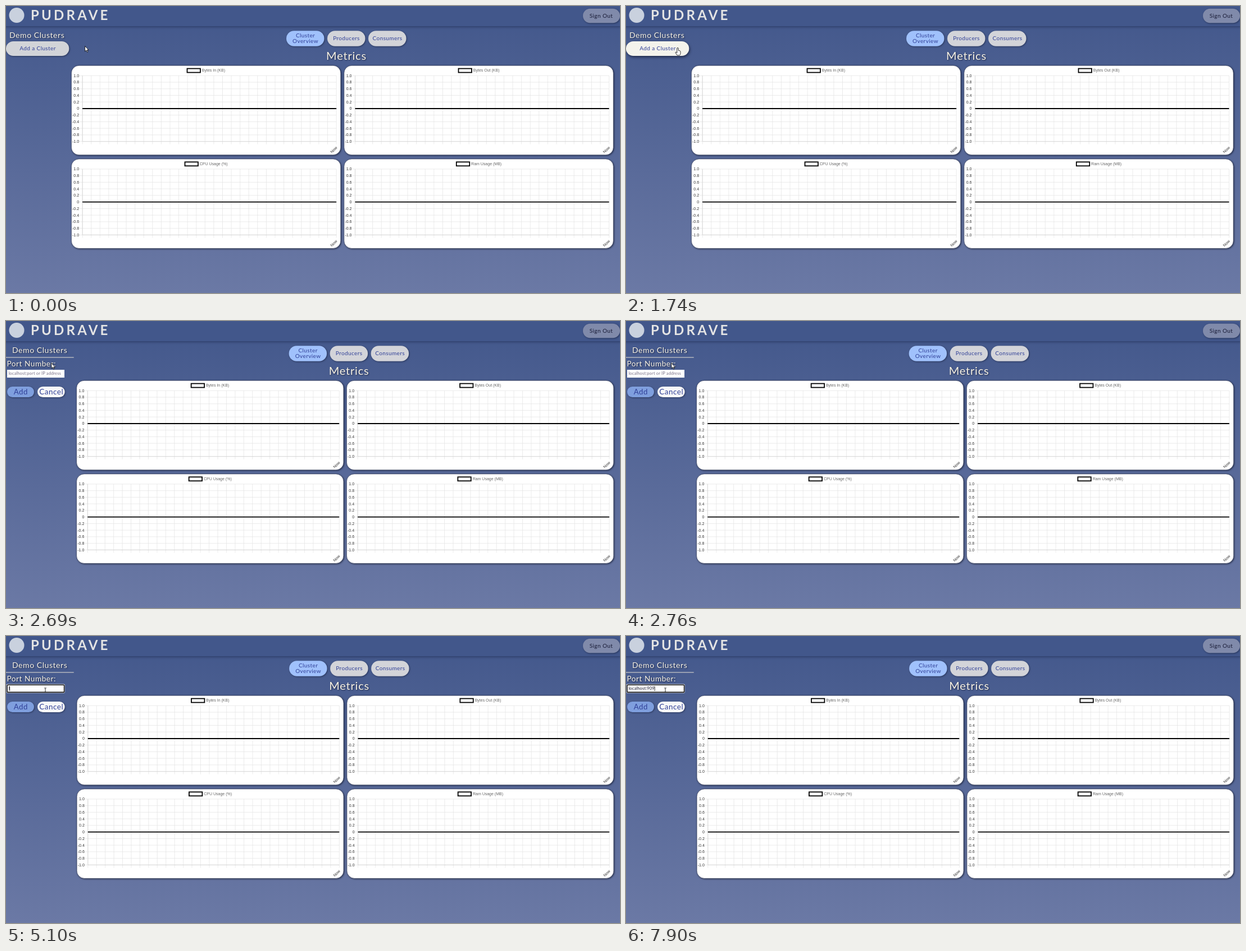
Animation of 1093 by 512 pixels, one loop 8 s. Source, as an HTML page:

```html
<!DOCTYPE html>
<html lang="en">
<head>
<meta charset="utf-8">
<title>Cluster dashboard</title>
<style>
  html, body { margin: 0; width: 100%; height: 100%; overflow: hidden; background: #566898; }
  svg { display: block; width: 100vw; height: 100vh; }
  text { font-family: Lato, "Open Sans", sans-serif; letter-spacing: .04em; white-space: pre; }
  .chart text { font: 7px "Liberation Sans", Arial, sans-serif; letter-spacing: 0; fill: #333; }
  .chart .legend { fill: #666; }
  .heading { fill: #f7f2e4; filter: drop-shadow(1px 1px 1px rgba(20, 25, 50, .75)); }
  .label { fill: #2f3f97; }
  .raised { filter: drop-shadow(1px 1px 1.5px rgba(15, 22, 50, .55)); }
  .panel { filter: drop-shadow(1px 1.5px 1.5px rgba(10, 15, 35, .7)); }
</style>
</head>
<body>
<svg id="stage" viewBox="0 0 1093 512" preserveAspectRatio="none"></svg>
<script>
const LOOP = 8000;
const stage = document.getElementById('stage');

// Markup helpers
const text = (x, y, size, content, attrs = '') =>
  `<text x="${x}" y="${y}" font-size="${size}" ${attrs}>${content}</text>`;
const rect = (x, y, w, h, fill, attrs = '') =>
  `<rect x="${x}" y="${y}" width="${w}" height="${h}" fill="${fill}" ${attrs}/>`;
const pill = (x, y, w, h, fill, attrs = 'class="raised"') =>
  rect(x, y, w, h, fill, `rx="${h / 2}" ${attrs}`);
const centred = (x, y, size, content, attrs = 'class="label"') =>
  text(x, y, size, content, `text-anchor="middle" ${attrs}`);
const line = (d, color, width) =>
  `<path d="${d}" fill="none" stroke="${color}" stroke-width="${width}"/>`;

function chart(x, y, width, title, legendOffset) {
  const left = x + 19.7, right = x + width - 7.7;
  const top = y + 18, pitch = 11.75, bottom = top + pitch * 10;
  const legendX = x + width / 2 - legendOffset;
  let grid = '', labels = '';
  for (let i = 0; i <= 10; i++) {
    const gy = top + i * pitch, value = 1 - i / 5;
    grid += `M${left - 5} ${gy}H${right}`;
    const label = i === 5 ? '0' : value.toFixed(1);
    labels += text(left - 6, gy + 2.4, 7, label, 'text-anchor="end"');
  }
  for (let i = 0; i < 30; i++)
    grid += `M${left + (right - left) * i / 29} ${top}V${bottom + 5}`;
  return `<g class="chart">
    ${rect(x, y, width, 159.5, '#fff', 'rx="13.5" class="panel" stroke="#27304d" stroke-width=".6"')}
    ${line(grid, '#e3e3e3', .7)}
    ${line(`M${left} ${top}V${bottom}H${right}`, '#cfcfcf', .7)}
    ${line(`M${left} ${top + 5 * pitch}H${right}`, '#000', 1.9)}
    ${labels}
    ${rect(legendX + .7, y + 5.4, 23.4, 7, '#fff', 'stroke="#000" stroke-width="1.8"')}
    ${text(legendX + 27, y + 11, 7, title, 'class="legend"')}
    <text transform="translate(${right + 2} ${y + 147}) rotate(-45)" text-anchor="end">Now</text>
  </g>`;
}

function mainArea(id, left, right, width, shift) {
  const tabs = [['', 499, '#a0c1fc'], ['Producers', 572, '#d3d4d9'], ['Consumers', 645, '#d3d4d9']]
    .map(([name, x, fill]) => pill(x + shift, 44.3, 67.5, 27.5, fill) +
      centred(x + shift + 34, 61.4, 10, name)).join('');
  return `<g id="${id}">
    ${tabs}
    ${centred(533 + shift, 56.2, 10, 'Cluster')}
    ${centred(533 + shift, 66.4, 10, 'Overview')}
    ${centred(606 + shift, 96, 20, 'Metrics', 'class="heading"')}
    ${chart(left, 106.2, width, 'Bytes In (KB)', 34.3)}
    ${chart(right, 106.2, width, 'Bytes Out (KB)', 36.7)}
    ${chart(left, 272.9, width, 'CPU Usage (%)', 38.3)}
    ${chart(right, 272.9, width, 'Ram Usage (MB)', 40.4)}
  </g>`;
}

const header = `
  ${rect(-10, -10, 1113, 46, '#42578b', 'style="filter:drop-shadow(0 1px 2.5px rgba(20,30,65,.6))"')}
  <circle cx="19" cy="16.5" r="13.5" fill="#c9d1de"/>
  ${text(44, 25, 24, 'PUDRAVE', 'fill="#e4e4e4" font-weight="700" style="letter-spacing:4.2px"')}
  ${pill(1027, 4.8, 66, 25.4, '#808aaa')}
  ${centred(1059.5, 21, 10, 'Sign Out', 'fill="#171a35"')}`;

const addForm = `<g id="addForm">
  ${text(11, 56.5, 14, 'Demo Clusters', 'class="heading"')}
  ${rect(0, 64.4, 120.7, 1.1, '#d9d6cf')}
  ${text(1.5, 81, 13.6, 'Port Number:', 'class="heading"')}
  ${rect(2, 87, 102, 14, '#fff')}
  <g id="focusRing">
    ${rect(.6, 85.8, 104.2, 16, '#fff', 'rx="2"')}
    ${rect(2, 87.2, 101.6, 13.2, '#fff', 'rx="1" stroke="#101010" stroke-width="1.6"')}
  </g>
  <text id="entry" x="4.4" y="96.4" font-size="7.5" style="letter-spacing:.02em"></text>
  <rect id="caret" y="89.5" width=".8" height="8.5" fill="#000"/>
  ${pill(2, 117, 48, 19, '#7f9fde')}
  ${centred(26.3, 130.6, 13.2, 'Add')}
  ${pill(56, 117, 48.7, 19, '#f8f8f8')}
  ${centred(80.7, 130.6, 13.4, 'Cancel')}
</g>`;

const outlined = 'fill="#fff" stroke="#000" stroke-width=".8" stroke-linejoin="round"';

stage.innerHTML = `
  <defs><linearGradient id="sky" x2="0" y2="1">
    <stop stop-color="#42578b"/><stop offset="1" stop-color="#6b79a5"/>
  </linearGradient></defs>
  ${rect(0, 0, 1093, 512, 'url(#sky)')}
  ${header}
  ${mainArea('wide', 116.4, 601.8, 479.4, 0)}
  ${mainArea('narrow', 125.6, 606.4, 475.3, 4.6)}
  ${mainArea('focused', 126.1, 606.9, 474.9, 5.1)}
  <g id="startMenu">
    ${text(6, 56.5, 14, 'Demo Clusters', 'class="heading"')}
    ${pill(0, 63, 112.3, 26, '#d2d4d8', 'id="addButton"')}
    ${centred(56.5, 79.2, 10, 'Add a Cluster')}
  </g>
  ${addForm}
  <g id="pointer">
    <circle id="halo" r="6" fill="#f4e52c"/>
    <path id="arrow" d="M0 0V9.5L2.2 7.4 3.8 11 5.2 10.3 3.7 7H6.4Z" ${outlined}/>
    <path id="hand" d="M-1.2.8Q0-.6 1.2.8V4.8L4 5.6Q5 6 5 7.4V10Q5 12 3.6 13.6H-1L-4 9Q-4 7.4-2.8 8L-1.2 9.3Z" ${outlined}/>
    <path id="beam" d="M-1.8-3.8H-.6L0-3.3.6-3.8H1.8M0-3.3V3.3M-1.8 3.8H-.6L0 3.3.6 3.8H1.8" fill="none" stroke="#111" stroke-width=".9"/>
  </g>`;

const el = {};
stage.querySelectorAll('[id]').forEach(node => el[node.id] = node);
const show = (name, visible) => { el[name].style.display = visible ? '' : 'none'; };

// The screen refreshes only in these bursts: [first, last, count]
const changes = [0];
for (const [first, last, count] of [
  [1060, 1810, 12], [1880, 2020, 3], [2560, 2560, 1], [2620, 2690, 2], [2760, 3290, 8],
  [3370, 3570, 4], [3770, 3770, 1], [3900, 4040, 3]
]) {
  for (let i = 0; i < count; i++)
    changes.push(Math.floor((first + (last - first) * i / Math.max(1, count - 1)) / 10) * 10);
}
const lastChange = t => changes.findLast(c => c <= t);

const pointerPath = [
  [1000, 140.6, 71.5], [1740, 92, 74.3], [1810, 88, 74.8], [2020, 81, 75],
  [2760, 81, 75], [3290, 78, 88], [3570, 72, 92.5], [3900, 72, 92.5], [4040, 70, 96.6]
];
function pointerAt(t) {
  const next = pointerPath.findIndex(p => p[0] > t);
  if (next === 0) return pointerPath[0].slice(1);
  if (next < 0) return pointerPath.at(-1).slice(1);
  const a = pointerPath[next - 1], b = pointerPath[next];
  const k = (t - a[0]) / (b[0] - a[0]);
  return [a[1] + (b[1] - a[1]) * k, a[2] + (b[2] - a[2]) * k];
}

const typed = 'localhost:909';
const keyTimes = [5100, 5360, 5460, 5560, 5890, 6220, 6370, 6500, 6700, 6970, 7630, 7700, 7900];
const OPEN = 2690, FOCUS = 3770, HOVER = 1440, PRESS = 2560;
const clamp = v => Math.max(0, Math.min(1, v));
const mix = (a, b, k) => `rgb(${a.map((v, i) => Math.round(v + (b[i] - v) * k))})`;

function drawButton(t) {
  const hover = clamp((t - HOVER) / 280) - (t >= PRESS ? clamp((t - PRESS + 60) / 330) : 0);
  const depth = clamp((t - HOVER) / 280);
  el.addButton.setAttribute('fill', mix([210, 212, 216], [244, 243, 236], hover));
  el.addButton.style.filter =
    `drop-shadow(1px ${1 + depth}px ${1.5 + depth}px rgba(12, 18, 40, ${.55 + .2 * depth}))`;
}

function drawEntry(t) {
  const count = keyTimes.filter(k => k <= t).length;
  el.entry.textContent = count ? typed.slice(0, count) : 'localhost:port or IP address';
  el.entry.setAttribute('fill', count ? '#14142c' : '#776f86');
  const caretOn = t >= FOCUS && !(t >= 4300 && t < 4830) && !(t >= 7560 && t < 7630);
  show('caret', caretOn);
  const end = count ? 4.4 + el.entry.getComputedTextLength() : 4.2;
  el.caret.setAttribute('x', end);
}

function render(t) {
  const held = lastChange(t);
  show('wide', t < OPEN);
  show('startMenu', t < OPEN);
  show('narrow', t >= OPEN && t < FOCUS);
  show('focused', t >= FOCUS);
  show('addForm', t >= OPEN);
  show('focusRing', t >= FOCUS);
  drawButton(held);
  if (t >= OPEN) drawEntry(t);

  const [x, y] = pointerAt(held);
  const onButton = held >= 1060 && held < PRESS && x < 112;
  const onInput = held >= OPEN && y >= 87;
  el.pointer.setAttribute('transform', `translate(${x} ${y})`);
  show('hand', onButton);
  show('beam', onInput);
  show('arrow', !onButton && !onInput);
  show('halo', held >= FOCUS && held < 4040);
  el.halo.setAttribute('opacity', .85 * (1 - clamp((held - FOCUS) / 270)));
}

function tick() {
  render(performance.now() % LOOP);
  requestAnimationFrame(tick);
}
tick();
</script>
</body>
</html>
```
